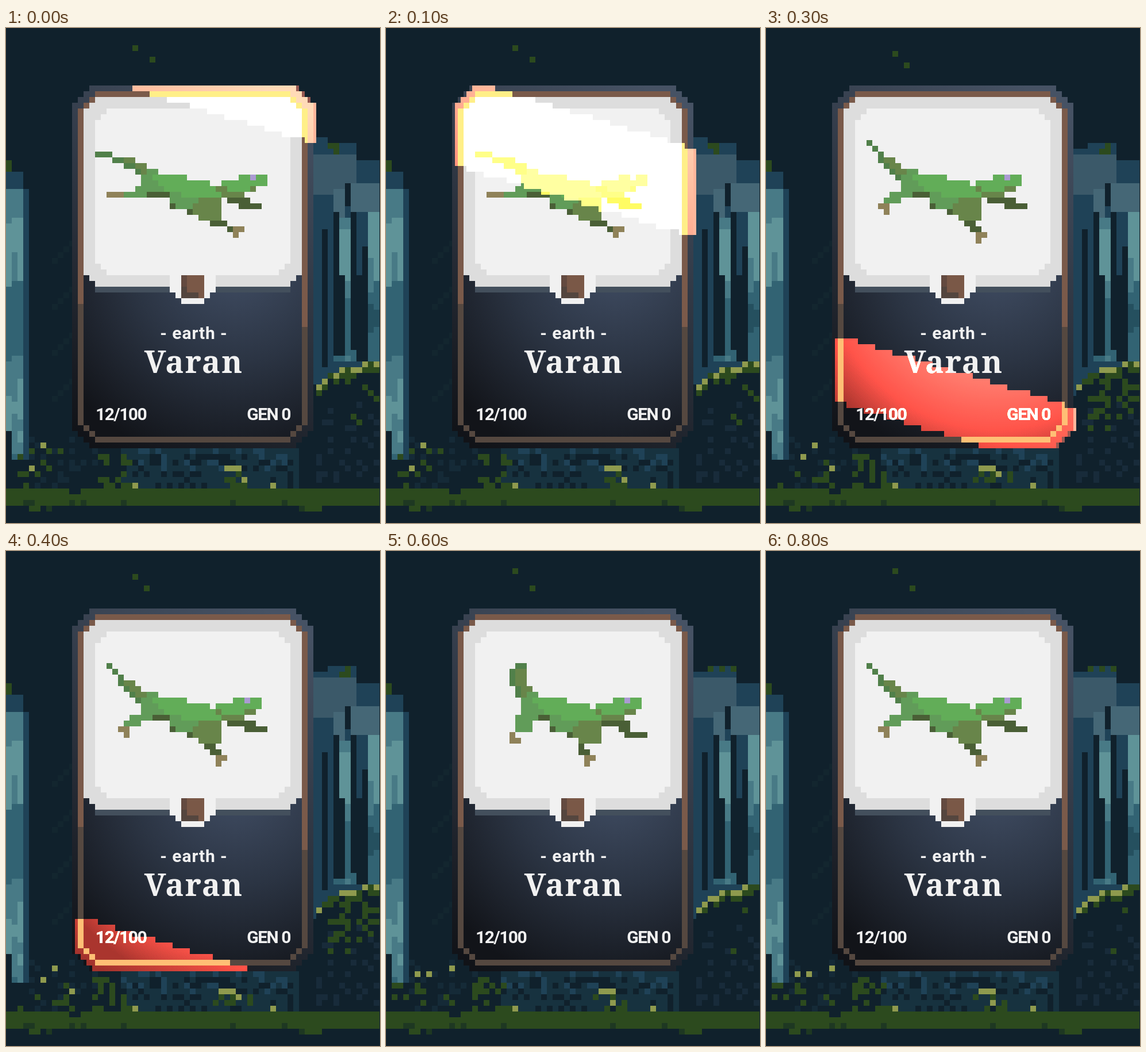
Write an HTML page with a canvas that moves like this. It is 651 by 861 pixels and loops after 1.1 s.

```html
<!DOCTYPE html>
<html lang="en">
<head>
<meta charset="utf-8">
<title>Creature card</title>
<style>
html, body { margin: 0; width: 651px; height: 861px; overflow: hidden; background: #10212c; }
canvas { display: block; }
</style>
</head>
<body>
<canvas id="stage" width="651" height="861"></canvas>
<script>
const ctx = document.getElementById('stage').getContext('2d');
const CELL = 10.015, LOOP = 1100;
const px = v => Math.floor(v * CELL + 0.01);

const NIGHT = '#10212c', LEAF = '#2c4a1e', GOLD = '#8f9a4e', PAPER = '#f1f1f1';
const DEEP = '#1f4257', SLATE = '#3b5969', MIST = '#456776';
const HAZE = ['#5f9398', '#487a86', '#326373', '#25505f'];

// Positions and sizes below are in cells
function box(color, x, y, w, h) {
  ctx.fillStyle = color;
  ctx.fillRect(px(x), px(y), px(x + w) - px(x), px(y + h) - px(y));
}

function octagon(color, x, y, w, h, cut) {
  for (let i = 0; i < w; i++) {
    const inset = Math.max(0, cut - Math.min(i, w - 1 - i));
    box(color, x + i, y + inset, 1, h - 2 * inset);
  }
}

function inside(points, x, y) {
  let hit = false;
  points.forEach(([ax, ay], i) => {
    const [bx, by] = points[(i + 1) % points.length];
    if (ay > y !== by > y && x < ax + (bx - ax) * (y - ay) / (by - ay)) hit = !hit;
  });
  return hit;
}

function random(seed) {
  const next = () => (seed = seed * 16807 % 2147483647) / 2147483647;
  next();
  return next;
}

function scatter(color, count, x, y, w, h, seed) {
  const rnd = random(seed);
  while (count--) box(color, x + Math.floor(rnd() * w), y + Math.floor(rnd() * h), 1, 1);
}

// Misty light that brightens and dims with height
function haze(x, w, top, end, seed) {
  const rnd = random(seed);
  for (let i = x; i < x + w; i++) {
    for (let y = top, h; y < end; y += h) {
      h = Math.min(end - y, 2 + Math.floor(rnd() * 4));
      const shade = 1.2 - 1.2 * Math.cos((y + h / 2 - 38) / 28 * 2 * Math.PI) + rnd() - 0.5;
      box(HAZE[Math.max(0, Math.min(3, Math.round(shade)))], i, y, 1, h);
    }
  }
}

function woods(state) {
  box(DEEP, 0, 25, 3, 50);
  box(DEEP, 3, 28, 1, 47);
  haze(0, 3, 28, 70, 8);
  haze(1, 2, 70, 75, 5);
  box(NIGHT, 0, 70, 1, 5);
  for (let i = 0; i < 16; i++) box('#13262f', 11 - i % 4, 37 + i + 4 * Math.floor(i / 4), 1, 1);

  box(DEEP, 53, state ? 21 : 19, 3, 43);
  box(DEEP, 56, 20, 5, 40);
  box(DEEP, 61, 23, 4, 36);
  box(SLATE, 53, 22, 8, 7);
  box(MIST, 60, 27, 5, 5);
  box(MIST, 57, 28, 2, 6);
  haze(57, 4, 33, 58, 31);
  haze(63, 2, 32, 58, 12);
  for (const x of [55, 57, 60, 62]) box(NIGHT, x, 32 + x % 3 * 3, x === 62 ? 1 : 0.99, 24);
  box(NIGHT, 61, 43, 1, 15);
  box(NIGHT, 57, 43, 2, 14);
  box(NIGHT, 59, 27, 1, 4);
}

const crest = x => Math.round(62 - 4 * Math.sqrt((x - 54) / 10));

function brush(state) {
  for (let x = 54; x < 65; x++) box(NIGHT, x, crest(x), 1, 80 - crest(x));
  scatter('#182b3a', 34, 54, 65, 11, 14, 91);
  box('#17323f', 20, 73, 31, 7);
  scatter(DEEP, 36, 20, 73, 30, 4, 17);
  scatter(NIGHT, 60, 20, 74, 32, 6, 53);
  scatter('#152a37', 24, 4, 71, 14, 9, 23);

  const rnd = random(40 + state);
  for (let x = 54; x < 65; x++) {
    box(rnd() < 0.55 ? GOLD : LEAF, x, crest(x), 1, 1);
    if (rnd() < 0.7) box(LEAF, x, crest(x) + 1, 1, 1);
  }
  scatter(LEAF, [8, 34, 2][state], 56, 61, 9, 9, 300 + state);
  scatter(LEAF, 3, 56, 20, 6, 2, 70 + state);
  scatter(LEAF, 18, 15, 74, 7, 6, 41 + state);
  scatter(LEAF, 10, 36, 77, 7, 3, 67 + state);
  scatter(LEAF, 10, 1, 73, 11, 7, 12 + state);
  scatter(GOLD, 3, 2, 71, 10, 6, 25 + state);
  for (const x of [22, 46]) box(GOLD, x, 79, 1, 1);
  box(GOLD, 38 - Math.min(state, 1), 76, 3, 1);
  box(GOLD, 41 - state, 78 - state % 2, 1, 1);
  box(LEAF, 0, 23, 1, 2);

  const blown = state === 1;
  box(LEAF, 22, blown ? 4 : 3, 1, 1);
  box(LEAF, blown ? 24 : 25, state ? 6 : 5, 1, 1);
}

function ground() {
  box(LEAF, 0, 80, 65, 3);
  box(LEAF, 4, 83, 2, 1);
  box(LEAF, 52, 83, 3, 1);
  box(NIGHT, 11, 80, 2, 1);
  scatter('#1e3822', 9, 0, 82, 65, 2, 6);
}

function gradient(fill, ...stops) {
  stops.forEach((color, i) => fill.addColorStop(i / (stops.length - 1), color));
  return fill;
}

function words(text, x, y, font, align, spacing) {
  ctx.fillStyle = PAPER;
  ctx.font = font;
  ctx.textAlign = align;
  ctx.letterSpacing = spacing + 'px';
  ctx.fillText(text, x, y);
}

function card() {
  const rim = gradient(ctx.createLinearGradient(500, 130, 150, 720), '#465264', '#111318');
  const panel = gradient(ctx.createRadialGradient(400, 400, 0, 400, 400, 365), '#424f66', '#2b3443', '#121419');
  const wood = ctx.createLinearGradient(130, 480, 126, 519);
  wood.addColorStop(0, '#7a5a4a');
  wood.addColorStop(0, '#554840');

  octagon(rim, 11.5, 10, 42, 63, 3);
  octagon(wood, 12.5, 11, 40, 61, 3);
  octagon(panel, 13.5, 12, 38, 59, 2);

  octagon('#dddddd', 13.5, 12, 38, 33, 2);
  for (const x of [15.5, 36.5]) box('#434f5c', x, 45, 13, 1);
  octagon(PAPER, 15.5, 14, 34, 29, 2);
  box(PAPER, 28.5, 43, 8, 3);
  box(PAPER, 29.5, 46, 6, 1);
  box(PAPER, 30.5, 47, 4, 1);
  box('#54463f', 30.5, 43, 4, 4);
  box('#634a40', 30.5, 43, 1, 2);
  box('#7a5847', 31.5, 43, 3, 3);
  box('#7a5847', 33.5, 46, 1, 1);

  const small = '600 30px Roboto, sans-serif';
  words('- earth -', 327, 541, small, 'center', 0.9);
  words('12/100', 156, 682, small, 'left', -1.5);
  words('GEN 0', 495, 682, small, 'right', -1.5);
  words('Varan', 327, 600, '900 54px "Noto Serif", serif', 'center', 2);
}

const SKIN = { bright: '#62ad58', mid: '#619c59', tail: '#51804a', olive: '#68854a',
  dark: '#4a5f36', claw: '#8f8259', eye: '#aa9bd2' };

// Body parts shared by every pose; limbs bend through a few joints
const BELLY = [[8, 7], [12, 7], [13, 9], [15, 9], [16, 10]];
const FLANK = [[8, 4], [16, 4], [19, 8], [19, 10], [16, 10], [13, 9], [13, 7], [8, 7]];
const BACK = [[9, 4], [16, 4], [16, 5], [20, 5], [22, 8], [18, 8], [13, 7]];
const CHEST = [[17, 11], [17, 10], [19, 8], [22, 8], [22, 12], [19, 12]];
const HEAD = [[25, 4], [30, 4], [30, 6], [24, 7], [22, 6], [22, 5], [25, 5]];

const STRETCH = {
  head: 0,
  tail: [[0, 0], [1, 0], [4, 1], [7, 3], [8, 5]],
  hind: [[10, 5], [8, 6], [5, 7]], hindClaw: [[2, 7], [4, 7]],
  front: [[20, 12], [22, 12], [23, 13]], frontClaw: [[25, 13], [24, 13], [24, 14]],
  arm: [[23, 8], [25, 8], [25, 9], [27, 9]]
};
const LEAP = {
  head: -1,
  tail: [[2, -2], [3, -1], [4, 1], [7, 4], [8, 5]],
  hind: [[9, 6], [6, 7], [5, 8]], hindClaw: [[4, 9], [5, 9], [5, 10]],
  front: [[19, 12], [20, 12], [20, 13], [21, 13]], frontClaw: [[22, 14], [21, 14], [21, 15]],
  arm: [[23, 8], [26, 8], [26, 9], [28, 9]]
};
const GATHER = {
  head: -1,
  tail: [[8, -2], [7, -2], [6, -1], [6, 1], [8, 4], [8, 5]],
  hind: [[9, 6], [7, 7], [7, 9]], hindClaw: [[6, 10], [6, 11], [7, 11]],
  front: [[18, 12], [18, 13], [19, 13]], frontClaw: [[20, 14], [19, 14], [19, 15]],
  arm: [[22, 8], [25, 8], [25, 9], [26, 10], [28, 10]]
};

function lizard(pose) {
  const put = (part, x, y, w = 1) => box(SKIN[part], 15.5 + x, 21.5 + y, w, 1);
  const limb = (part, w, joints) => joints.slice(1).forEach(([bx, by], i) => {
    const [ax, ay] = joints[i], n = Math.max(Math.abs(bx - ax), Math.abs(by - ay));
    for (let k = 0; k <= n; k++)
      put(part, Math.round(ax + (bx - ax) * k / n), Math.round(ay + (by - ay) * k / n), w);
  });
  const fill = (part, points, dx = 0) => {
    for (let y = 4; y < 12; y++)
      for (let x = 8; x < 30; x++)
        if (inside(points, x + 0.5, y + 0.5)) put(part, x + dx, y);
  };
  limb('dark', 1, BELLY);
  limb('olive', 3, pose.tail.slice(2));
  limb('tail', 1, pose.tail);
  put('mid', 9, 3, 2);
  fill('mid', FLANK);
  limb('mid', 3, pose.hind);
  limb('claw', 1, pose.hindClaw);
  limb('dark', 1, pose.front);
  limb('claw', 1, pose.frontClaw);
  fill('olive', CHEST);
  fill('bright', BACK);
  limb('dark', 2, pose.arm);
  put('olive', 22, 7, 4);
  put('olive', 21, 6, 7);
  fill('bright', HEAD, pose.head);
  put('eye', 27 + pose.head, 4);
}

// Slanted light that sweeps down the card, one step each 100 ms
const HIGH = [-9, 8.5, 25, 53.5, 63.5], LOW = [7.7, 24, 39.5, 65, 76];

function shine(step) {
  if (step >= HIGH.length) return;
  for (let i = 0; i < 42; i++) {
    const inset = Math.max(0, 3 - Math.min(i, 41 - i));
    const top = Math.max(10 + inset, Math.round(HIGH[step] + 0.3 * i));
    const end = Math.min(73 - inset, Math.round(LOW[step] + 0.3 * i));
    if (end <= top) continue;
    if (i === 41) box('#3a4555', 53.5, top, 0.5, end - top);
    ctx.globalCompositeOperation = 'color-dodge';
    box('#e49f74', 12 + i, top, 1, end - top);
    ctx.globalCompositeOperation = 'source-over';
  }
}

function frame(now) {
  const t = now % LOOP;
  const state = t < 300 ? 0 : t < 500 ? 1 : 2;
  box(NIGHT, 0, 0, 66, 87);
  woods(state);
  brush(state);
  ground();
  card();
  lizard(t >= 800 ? LEAP : [STRETCH, LEAP, GATHER][state]);
  shine(Math.floor(t / 100));
}

const start = performance.now();
function tick() {
  frame(performance.now() - start);
  requestAnimationFrame(tick);
}
tick();
</script>
</body>
</html>
```
